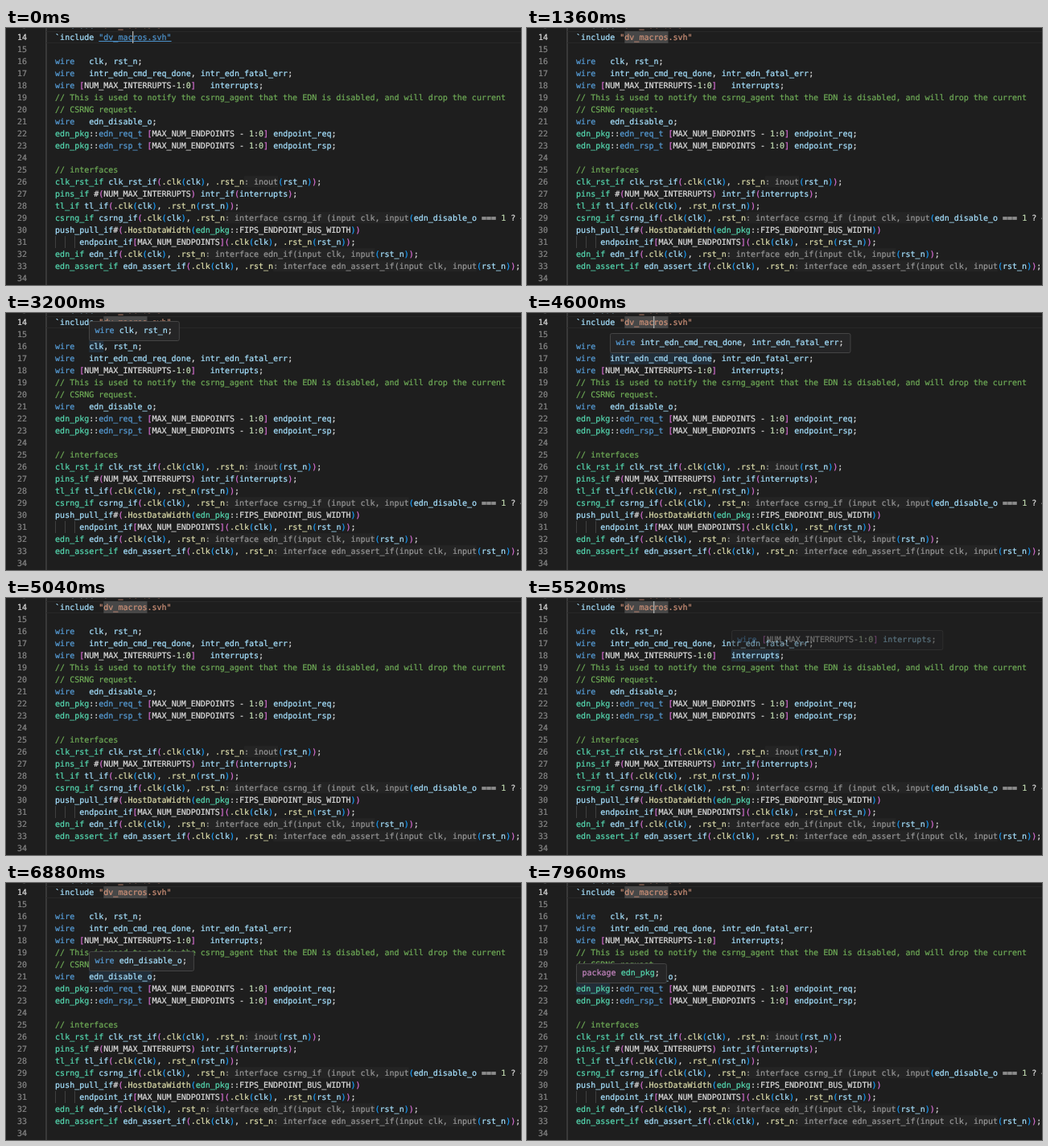
Recreate the animation shown at these times as an HTML page. Size 640 px wide and 320 px high, loop 8000 ms.

```html
<!DOCTYPE html>
<html lang="en">
<head>
<meta charset="utf-8">
<title>Hover hints in a code editor</title>
<style>
  html, body { margin: 0; width: 100%; height: 100%; overflow: hidden; background: #1e1e1e; }
  svg { display: block; }
  text {
    font: 10px "DejaVu Sans Mono", "Liberation Mono", monospace;
    white-space: pre;
    text-rendering: geometricPrecision;
    stroke-width: 0.22px;
  }
</style>
</head>
<body>
<svg id="stage" width="640" height="320" viewBox="0 0 640 320"></svg>
<script>
const LOOP = 8000, FRAME = 40, FADE = 120;
const CHAR = 6.02, ROW = 15, LEFT = 61.1, FIRST = 14, TOP = 4, BASE = 10.8;
const stage = document.getElementById('stage');

// Inlay hints are written between « and ».
const code = [
  '`include "uvm_macros.svh"',
  '`include "dv_macros.svh"',
  '',
  'wire   clk, rst_n;',
  'wire   intr_edn_cmd_req_done, intr_edn_fatal_err;',
  'wire [NUM_MAX_INTERRUPTS-1:0]   interrupts;',
  '// This is used to notify the csrng_agent that the EDN is disabled, and will drop the current',
  '// CSRNG request.',
  'wire   edn_disable_o;',
  'edn_pkg::edn_req_t [MAX_NUM_ENDPOINTS - 1:0] endpoint_req;',
  'edn_pkg::edn_rsp_t [MAX_NUM_ENDPOINTS - 1:0] endpoint_rsp;',
  '',
  '// interfaces',
  'clk_rst_if clk_rst_if(.clk(clk), .rst_n«: inout»(rst_n));',
  'pins_if #(NUM_MAX_INTERRUPTS) intr_if(interrupts);',
  'tl_if tl_if(.clk(clk), .rst_n(rst_n));',
  'csrng_if csrng_if(.clk(clk), .rst_n«: interface csrng_if (input clk, input»(edn_disable_o === 1 ? ~edn_disable_o : rst_n));',
  'push_pull_if#(.HostDataWidth(edn_pkg::FIPS_ENDPOINT_BUS_WIDTH))',
  '     endpoint_if[MAX_NUM_ENDPOINTS](.clk(clk), .rst_n(rst_n));',
  'edn_if edn_if(.clk(clk), .rst_n«: interface edn_if(input clk, input»(rst_n));',
  'edn_assert_if edn_assert_if(.clk(clk), .rst_n«: interface edn_assert_if(input clk, input»(rst_n));',
  ''
];

// A tip shows between "from" and "to"; its fade runs from "fade" on.
const tips = [
  { text: 'wire clk, rst_n;', row: 16, col: 7, len: 3, fade: 2640, from: 2760, to: 3680 },
  { text: 'wire intr_edn_cmd_req_done, intr_edn_fatal_err;', row: 17, col: 7, len: 21, fade: 3640, from: 3680, to: 4640 },
  { text: 'wire [NUM_MAX_INTERRUPTS-1:0] interrupts;', row: 18, col: 32, len: 10, fade: 5470, from: 5480, to: 5840 },
  { text: 'wire edn_disable_o;', row: 21, col: 7, len: 13, fade: 6310, from: 6320, to: 7040 },
  { text: 'package edn_pkg;', row: 22, col: 0, len: 7, fade: 7840, from: 7880, to: LOOP }
];

const blinks = [440, 920, 1360, 1840, 2280, 2760, 3200, 3680, 4120, 4600,
  5040, 5480, 5960, 6440, 6880, 7360, 7800];

const colX = col => LEFT + col * CHAR;
const rowY = row => TOP + (row - FIRST) * ROW;

function add(tag, attrs, parent = stage, content) {
  const node = document.createElementNS('http://www.w3.org/2000/svg', tag);
  for (const key in attrs) node.setAttribute(key, attrs[key]);
  if (content !== undefined) node.textContent = content;
  parent.appendChild(node);
  return node;
}

const rect = (x, y, width, height, fill, parent) =>
  add('rect', { x, y, width, height, fill }, parent);

const ink = color => ({ fill: color, stroke: color });
const brackets = ['#da70d6', '#179fff', '#ffd700'];

function colorOf(token, index, next) {
  if (token.startsWith('//')) return '#6eaa56';
  if (token[0] === '«') return '#969696';
  if (token[0] === '"') return '#ce9178';
  if (token === 'wire' || /^edn_(req|rsp)_t$/.test(token)) return '#569cd6';
  if (token === 'package') return '#c586c0';
  if (/^\.\w/.test(token)) return '#dcdcaa';
  if (/^\d/.test(token)) return '#c0dab0';
  if (/^[A-Z_]+$/.test(token)) return '#dcdcdc';
  if (token === 'edn_pkg') return '#55d8b0';
  if (/^[a-z]/.test(token)) return index || next === '#' ? '#a6e1ff' : '#55d8b0';
  return token[0] === '`' ? '#a6e1ff' : '#dcdcdc';
}

// Draws one coloured line and returns its string token, if any.
function drawCode(line, x, y, parent) {
  const text = add('text', { x, y }, parent);
  const tokens = line.match(/«[^»]*»|\/\/.*|"[^"]*"|[.`]?\w+|[()[\]]|\s+|[^\w\s]/g) || [];
  let depth = 0, col = 0, quoted = null;
  tokens.forEach((token, index) => {
    let color = colorOf(token, index, tokens[index + 1]);
    if (/^[([]$/.test(token)) color = brackets[depth++ % 3];
    if (/^[)\]]$/.test(token)) color = brackets[--depth % 3];
    const shown = token.replace(/[«»]/g, '');
    if (token[0] === '«') {
      const back = rect(x + col * CHAR, y - 10.5, shown.length * CHAR, 14, '#242424', parent);
      parent.insertBefore(back, text);
    }
    const span = add('tspan', ink(color), text, shown);
    if (token[0] === '"') quoted = span;
    col += shown.length;
  });
  return quoted;
}

rect(0, 0, 640, 320, '#1e1e1e');
rect(49.5, 0, 1, 320, '#555');
for (const y of [TOP, TOP + ROW - 1]) rect(50, y, 590, 1, '#282828');
for (const col of [0, 2, 4]) rect(Math.round(colX(col)), rowY(31), 1, ROW, '#404040');
const wordMark = rect(colX(10), TOP, 9 * CHAR, ROW, '#474747');
for (const tip of tips) {
  tip.mark = rect(colX(tip.col), rowY(tip.row), tip.len * CHAR, ROW, '#222e39');
}

let link;
code.forEach((line, i) => {
  const row = FIRST - 1 + i, y = rowY(row) + BASE;
  const color = row === FIRST ? '#d8d8d8' : '#858585';
  add('text', { x: 26, y, 'text-anchor': 'end', ...ink(color) }, stage, row);
  const quoted = drawCode(line, LEFT, y, add('g', {}));
  if (row === FIRST) link = quoted;
});
const underline = rect(colX(9), 16, 15 * CHAR, 1, '#4e94ce');
const caret = rect(colX(16) - 0.4, TOP, 1.3, ROW, '#aeafad');

for (const tip of tips) {
  const x = Math.round(colX(tip.col)), y = rowY(tip.row) - 24;
  tip.box = add('g', {});
  add('rect', {
    x: x + 0.5, y: y + 0.5, width: tip.text.length * CHAR + 15.5, height: 24,
    rx: 2, fill: '#252526', stroke: '#454545'
  }, tip.box);
  drawCode(tip.text, x + 7.5, y + 15, tip.box);
}

const show = (node, visible) => node.setAttribute('visibility', visible ? 'visible' : 'hidden');

function render(ms) {
  const t = Math.floor(ms % LOOP / FRAME) * FRAME;
  const linked = t < 680;
  const linkInk = ink(linked ? '#4e94ce' : '#ce9178');
  for (const key in linkInk) link.setAttribute(key, linkInk[key]);
  show(underline, linked);
  show(wordMark, t >= 240);
  show(caret, blinks.filter(at => at <= t).length % 2 === 0);
  for (const tip of tips) {
    const visible = t >= tip.from && t < tip.to;
    show(tip.box, visible);
    show(tip.mark, visible);
    tip.box.setAttribute('opacity', Math.max(0, Math.min(1, (t - tip.fade) / FADE)));
  }
}

const start = performance.now();
function tick() {
  render(performance.now() - start);
  requestAnimationFrame(tick);
}
render(0);
requestAnimationFrame(tick);
</script>
</body>
</html>
```
